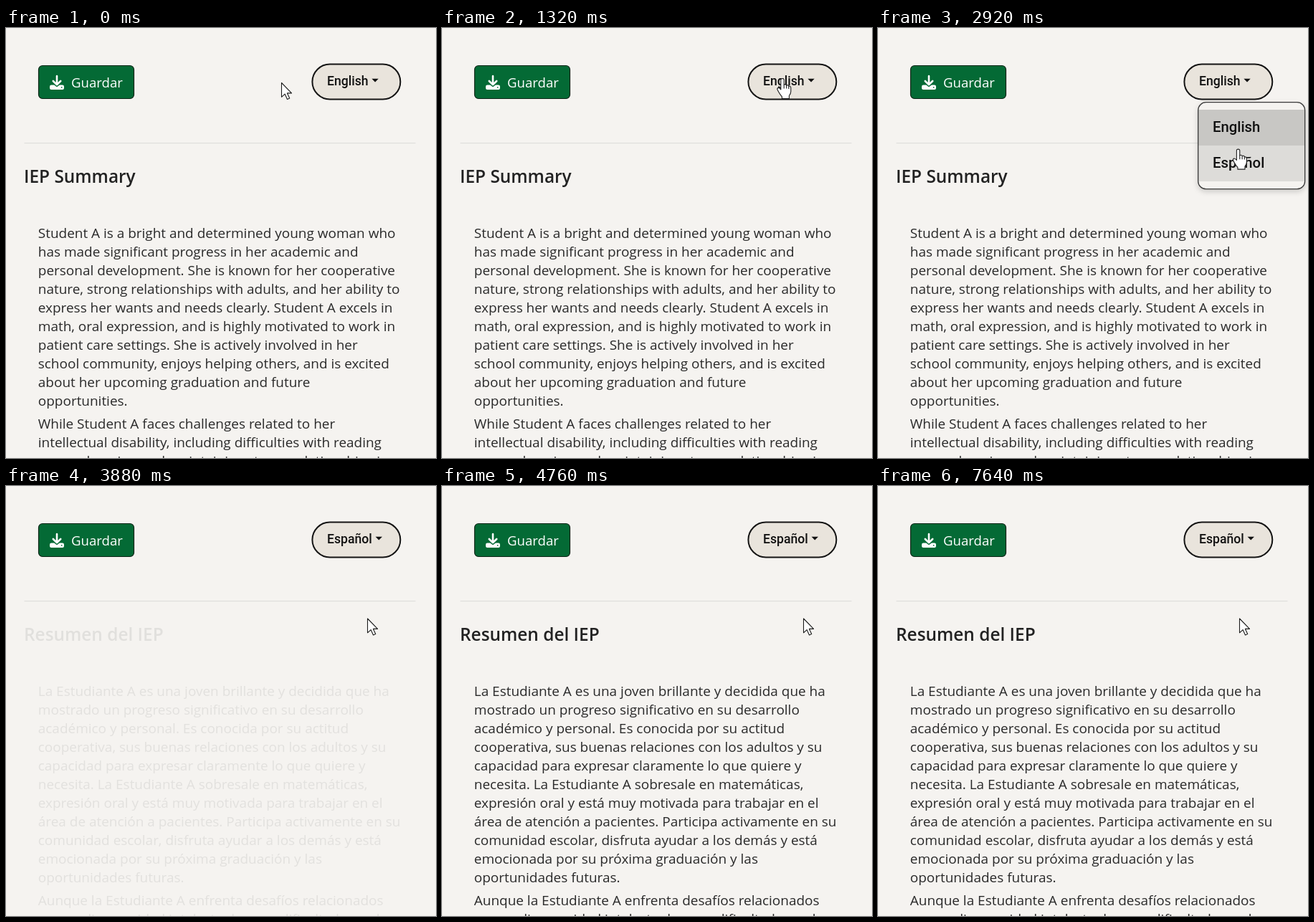
Animation of 600x600 px, one loop 8000 ms. Source, as an HTML page with a canvas:

```html
<!DOCTYPE html>
<html lang="en">
<head>
<meta charset="utf-8">
<title>IEP Summary</title>
<style>
  html, body { margin: 0; width: 100%; height: 100%; overflow: hidden; background: #f5f3f0; }
  canvas { display: block; width: 100vw; height: 100vh; }
</style>
</head>
<body>
<canvas id="stage" width="600" height="600"></canvas>
<script>
const ctx = document.getElementById('stage').getContext('2d');
const LOOP = 8000;
const OPEN = 1800, PICK = 3540, SWAP = 3800, SHOWN = 4240;
const PAPER = '#f5f3f0', INK = '#2a2a2a', GREEN = '#046a35';
const BODY = '18.97px "Open Sans", "Noto Sans", sans-serif';
const TITLE = '600 24.4px "Open Sans", "Noto Sans", sans-serif';
const SAVE = '18.6px "Open Sans", "Noto Sans", sans-serif';
const LABEL = '500 17.6px Roboto, sans-serif';
const ITEM = '500 20.3px Roboto, sans-serif';

const english = {
  label: 'English',
  title: 'IEP Summary',
  paragraphs: [[
    'Student A is a bright and determined young woman who',
    'has made significant progress in her academic and',
    'personal development. She is known for her cooperative',
    'nature, strong relationships with adults, and her ability to',
    'express her wants and needs clearly. Student A excels in',
    'math, oral expression, and is highly motivated to work in',
    'patient care settings. She is actively involved in her',
    'school community, enjoys helping others, and is excited',
    'about her upcoming graduation and future',
    'opportunities.'
  ], [
    'While Student A faces challenges related to her',
    'intellectual disability, including difficulties with reading',
    'comprehension and maintaining strong relationships in'
  ]]
};

const spanish = {
  label: 'Español',
  title: 'Resumen del IEP',
  paragraphs: [[
    'La Estudiante A es una joven brillante y decidida que ha',
    'mostrado un progreso significativo en su desarrollo',
    'académico y personal. Es conocida por su actitud',
    'cooperativa, sus buenas relaciones con los adultos y su',
    'capacidad para expresar claramente lo que quiere y',
    'necesita. La Estudiante A sobresale en matemáticas,',
    'expresión oral y está muy motivada para trabajar en el',
    'área de atención a pacientes. Participa activamente en su',
    'comunidad escolar, disfruta ayudar a los demás y está',
    'emocionada por su próxima graduación y las',
    'oportunidades futuras.'
  ], [
    'Aunque la Estudiante A enfrenta desafíos relacionados',
    'con su discapacidad intelectual, como dificultades en la'
  ]]
};

const arrow = new Path2D('M0 0V19.8L4.6 15.6L8 23L11.2 21.6L7.9 14.4H14Z');
const hand = new Path2D('M-2.2 2.2Q-2.2 0 0 0Q2.2 0 2.2 2.2V8.6Q4.4 7.4 5.6 9.4' +
  'Q7.8 8.4 8.8 10.6Q11.8 10.2 11.8 13.4V18Q11.8 21 9.4 24V28H-.6V25.4' +
  'Q-3.4 22.4 -5.4 18.6L-7 15.6Q-7.6 13.4 -5.8 12.9Q-4.2 12.7 -2.2 15.4Z');
const knuckles = new Path2D('M2.2 8.6V14M5.6 9.4V14M8.8 10.6V14.4');
const download = new Path2D('M71 67V78.5M65.8 74L71 79.2L76.2 74');

const clamp = v => Math.min(1, Math.max(0, v));
const smooth = (t, from, to) => {
  const p = clamp((t - from) / (to - from));
  return p * p * (3 - 2 * p);
};
const mix = (a, b, p) => a + (b - a) * p;

function text(str, x, y, font, color) {
  ctx.font = font;
  ctx.fillStyle = color;
  ctx.fillText(str, x, y);
}

function stroke(path, color, width) {
  ctx.strokeStyle = color;
  ctx.lineWidth = width;
  ctx.stroke(path);
}

function box(x, y, w, h, r, fill, line, width) {
  const path = new Path2D();
  path.roundRect(x, y, w, h, r);
  if (fill) {
    ctx.fillStyle = fill;
    ctx.fill(path);
  }
  if (line) stroke(path, line, width);
}

function saveButton() {
  box(45.5, 52.5, 133, 46, 5.5, GREEN, '#0c2416', 1.2);
  ctx.lineJoin = ctx.lineCap = 'round';
  box(61, 79.5, 20, 6.5, 2.2, '#fff');
  stroke(download, GREEN, 5.4);
  stroke(download, '#fff', 2.6);
  ctx.lineCap = 'butt';
  box(76.8, 82, 1.7, 1.7, 0.8, GREEN);
  text('Guardar', 91, 83, SAVE, '#fff');
}

function languageButton(label) {
  box(427.4, 50.5, 122.9, 49, 24.5, '#e9e4dc', '#141414', 2);
  text(label, 448, 80.2, LABEL, '#111');
  const x = 448 + ctx.measureText(label).width + 4.8;
  ctx.beginPath();
  ctx.moveTo(x, 70.7);
  ctx.lineTo(x + 9.4, 70.7);
  ctx.lineTo(x + 4.7, 75.5);
  ctx.fill();
}

function menu(hover) {
  ctx.save();
  ctx.shadowColor = 'rgba(0,0,0,.2)';
  ctx.shadowBlur = 8;
  ctx.shadowOffsetY = 3;
  box(446.7, 103.7, 149, 121, 11, PAPER);
  ctx.restore();
  ctx.fillStyle = '#c8c7c4';
  ctx.fillRect(447, 114, 148, 50);
  if (hover) {
    ctx.fillStyle = '#dddcd9';
    ctx.fillRect(447, 164, 148, 50);
  }
  box(446.7, 103.7, 149, 121, 11, null, '#3a3a3a', 1.3);
  text('English', 467, 145.4, ITEM, '#111');
  text('Español', 467, 195.4, ITEM, '#111');
}

function summary(page, alpha) {
  ctx.globalAlpha = alpha;
  text(page.title, 25, 216.4, TITLE, '#222');
  let y = 292.8;
  for (const lines of page.paragraphs) {
    for (const line of lines) {
      text(line, 44.8, y, BODY, INK);
      y += 26;
    }
    y += 6.3;
  }
  ctx.globalAlpha = 1;
}

function pointer(x, y, isHand) {
  const shape = isHand ? hand : arrow;
  ctx.save();
  ctx.translate(x, y);
  ctx.lineJoin = 'round';
  ctx.fillStyle = '#fff';
  ctx.fill(shape);
  stroke(shape, '#1c1c1c', 1.1);
  if (isHand) stroke(knuckles, '#1c1c1c', 1.1);
  ctx.restore();
}

function draw(t) {
  const picked = t >= PICK;
  const open = t >= OPEN && !picked;
  const toButton = smooth(t, 400, 1100);
  const toItem = smooth(t, 2400, 3080);
  const x = mix(mix(384.5, 475, toButton), 504.5, toItem);
  const y = mix(mix(76.5, 70.5, toButton), 185, toItem);

  ctx.fillStyle = PAPER;
  ctx.fillRect(0, 0, 600, 600);
  ctx.fillStyle = '#dfdedc';
  ctx.fillRect(25.5, 160, 546, 1.2);
  saveButton();
  languageButton((picked ? spanish : english).label);
  if (t < SWAP) summary(english, 1 - smooth(t, PICK, SWAP));
  else summary(spanish, smooth(t, SWAP, SHOWN));
  if (open) menu(y >= 164);

  const onButton = x > 428 && y < 100;
  const onItem = open && y >= 114;
  // the hand's fingertip sits slightly right of the hot spot
  pointer(x + (onItem ? 2.5 * toItem : 0), y, onButton || onItem);
}

function tick(now) {
  draw(now % LOOP);
  requestAnimationFrame(tick);
}
requestAnimationFrame(tick);
</script>
</body>
</html>
```
